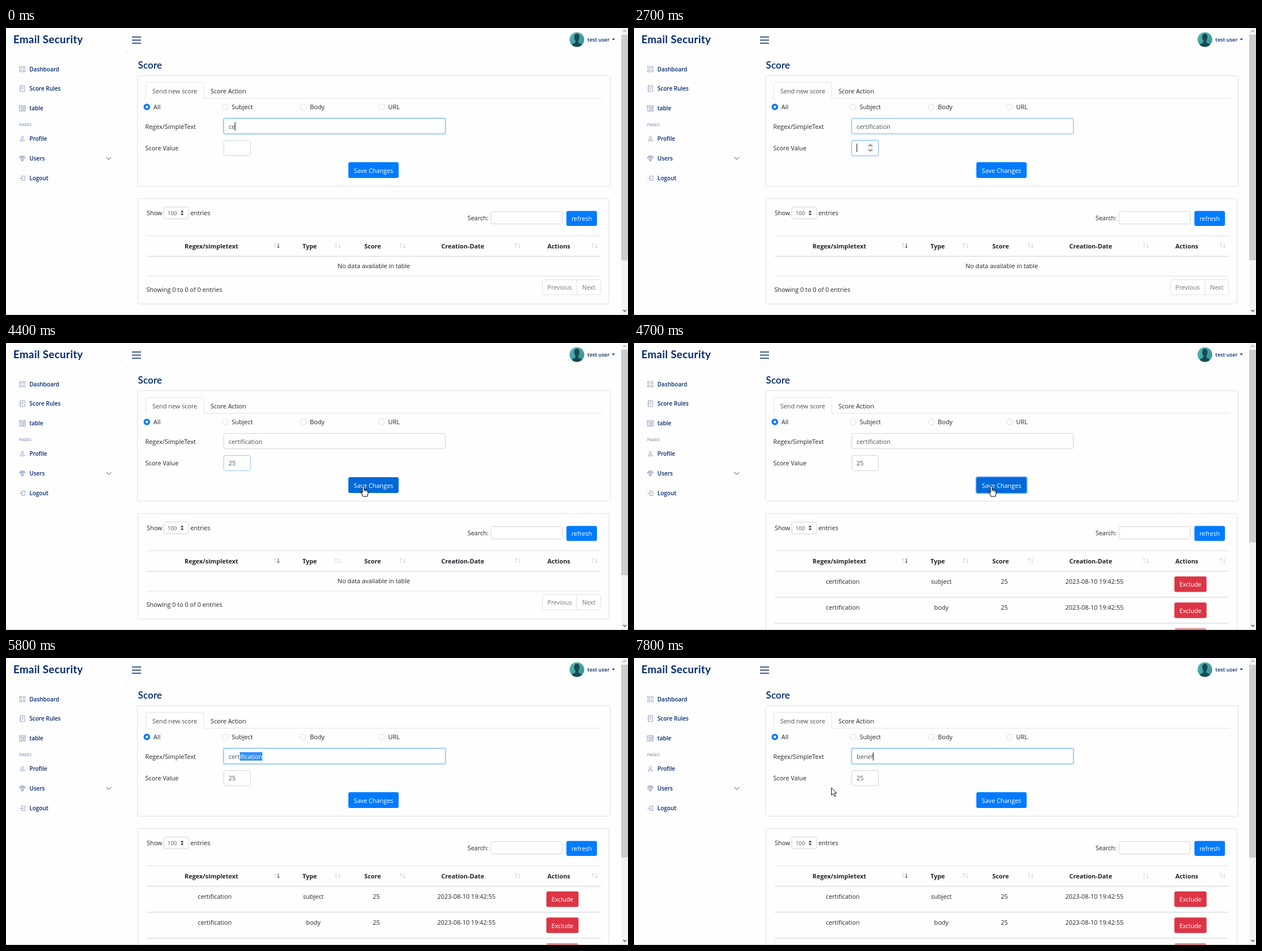
Write an HTML page with a canvas that moves like this. It is 1101 px wide and 509 px high and loops after 8 s.

```html
<!DOCTYPE html>
<html lang="en">
<head>
<meta charset="utf-8">
<title>Email Security</title>
<style>
html, body { margin: 0; width: 100%; height: 100%; overflow: hidden; background: #fefefe; }
canvas { display: block; }
</style>
</head>
<body>
<canvas id="stage" width="1101" height="509"></canvas>
<script>
const ctx = document.getElementById('stage').getContext('2d');
const LOOP = 8000;
const SANS = '"Open Sans", "Noto Sans", sans-serif';
const ROUND = 'Lato, "Open Sans", sans-serif';
const INK = '#212529', NAVY = '#012970', BLUE = '#007bff', RULE = '#dee2e6';
const FIELD_TEXT = '#495057', MUTED = '#899bbd', PAPER = '#fefefe';

// Stepped keyframes: [time, value]
const fill = [
  [0, 'ce'], [100, 'cer'], [300, 'cert'], [600, 'certi'], [800, 'certif'],
  [900, 'certific'], [1000, 'certifica'], [1200, 'certificat'],
  [1300, 'certificatio'], [1400, 'certification'],
  [7300, 'b'], [7400, 'be'], [7500, 'ben'], [7600, 'bene'], [7800, 'benef']
];
const score = [[0, ''], [3400, '2'], [3600, '25']];
const fillCaret = [[0, 1], [1800, 0], [2300, 1], [2700, 0], [5600, 1], [5700, 0], [7300, 1]];
const scoreCaret = [[0, 0], [2700, 1], [3200, 0], [3400, 1], [4100, 0]];
const fillFocus = [[0, 1], [2700, .5], [2800, 0], [5700, .6], [5800, 1]];
const scoreFocus = [[0, 0], [2700, .5], [2800, 1], [4400, .35], [4600, 0]];
const saveFocus = [[0, 0], [4600, .6], [4700, 1], [5600, .8], [5700, .3], [5800, 0]];
const saveDark = [[0, 0], [4000, .6], [4100, 1], [5700, .4], [5800, 0]];
const spinner = [[0, 0], [2400, 1], [3700, 0], [6100, 1], [6300, 0]];
const selectFrom = [[0, -1], [5700, 9], [5800, 4], [5900, 0], [7300, -1]];
const loaded = [[0, 0], [4600, 1]];
const mouse = [
  [0, null],
  [3700, ['arrow', 441, 222]], [3800, ['arrow', 508, 234]],
  [3900, ['arrow', 582, 247]], [4000, ['hand', 624, 252]],
  [4100, ['hand', 632, 253]],
  [5000, ['hand', 614, 244]], [5100, ['arrow', 556, 215]],
  [5200, ['arrow', 498, 191]], [5300, null],
  [5900, ['arrow', 366, 176]], [6100, ['arrow', 349, 226]],
  [6300, ['arrow', 349, 230]]
];

function at(keys, t) {
  let value = keys[0][1];
  for (const [time, v] of keys) if (t >= time) value = v;
  return value;
}

function setFont(size, weight, family) {
  ctx.font = `${weight} ${size}px ${family}`;
}

// y is the middle of the capitals
function text(str, x, y, opt = {}) {
  const { size = 10.9, weight = 400, color = INK, align = 'left', family = SANS, gap = 0 } = opt;
  setFont(size, weight, family);
  ctx.letterSpacing = gap + 'px';
  ctx.textAlign = align;
  ctx.fillStyle = color;
  ctx.fillText(str, x, y + size * .357);
  ctx.letterSpacing = '0px';
}

function widthOf(str) {
  setFont(10.9, 400, SANS);
  return ctx.measureText(str).width;
}

function rect(x, y, w, h, color) {
  ctx.fillStyle = color;
  ctx.fillRect(x, y, w, h);
}

function box(x, y, w, h, r, back, border) {
  ctx.beginPath();
  ctx.roundRect(x, y, w, h, r);
  if (back) { ctx.fillStyle = back; ctx.fill(); }
  if (border) { ctx.strokeStyle = border; ctx.lineWidth = 1; ctx.stroke(); }
}

function path(d, color, width = 1, back) {
  const p = new Path2D(d);
  if (back) { ctx.fillStyle = back; ctx.fill(p); }
  if (color) { ctx.strokeStyle = color; ctx.lineWidth = width; ctx.stroke(p); }
}

function disc(x, y, r, color, border) {
  ctx.beginPath();
  ctx.arc(x, y, r, 0, Math.PI * 2);
  if (color) { ctx.fillStyle = color; ctx.fill(); }
  if (border) { ctx.strokeStyle = border; ctx.lineWidth = 1; ctx.stroke(); }
}

function blend(a, b, k) {
  const c = a.map((v, i) => Math.round(v + (b[i] - v) * k));
  return `rgb(${c})`;
}

function glow(x, y, w, h, color, level) {
  if (!level) return;
  ctx.globalAlpha = level;
  box(x - 1.7, y - 1.7, w + 3.4, h + 3.4, 4, color);
  ctx.globalAlpha = 1;
}

function input(x, y, w, h, focus = 0) {
  glow(x, y, w, h, '#bfdeff', focus > .4 ? focus : 0);
  box(x, y, w, h, 3, '#fff', blend([206, 212, 218], [128, 189, 255], Math.min(1, focus * 2)));
}

function button(label, x, y, w, h, color) {
  box(x, y, w, h, 3, color);
  text(label, x + w / 2, y + h / 2 + .8, { color: '#fff', align: 'center' });
}

function caret(x, y) {
  rect(Math.round(x), y, 1, 15, '#111');
}

const menu = [
  ['Dashboard', 73, 'M1 1h5v5H1zM10 1h5v5h-5zM1 10h5v5H1zM10 10h5v5h-5z'],
  ['Score Rules', 107.5, 'M3 .5h11v15H3zM1 4h3M1 8h3M1 12h3M6 4.5h5M6 7.5h5M6 10.5h3'],
  ['table', 142.5, 'M.5 1h15v14H.5zM.5 4.5h15M5 4.5v10M7.5 7h6M7.5 9.5h6M7.5 12h6'],
  ['Profile', 196, 'M11 5a3 3 0 1 1-6 0a3 3 0 1 1 6 0M2.5 14c0-3 2-4 5.5-4s5.5 1 5.5 4z'],
  ['Users', 231.5, 'M3.5 1.5h9l3 4L8 15 .5 5.5zM.5 5.5h15M5.5 5.5L8 15l2.5-9.5M3.5 1.5l2 4L8 1.5l2.5 4 2-4'],
  ['Logout', 266.5, 'M6 5V2.5h8.5v11H6V11M.5 8h9M7 5.5L9.5 8 7 10.5']
];

function drawSidebar() {
  text('Email Security', 13, 20.5, { size: 18.8, weight: 700, color: NAVY, family: ROUND, gap: .35 });
  for (const [label, y, icon] of menu) {
    ctx.save();
    ctx.translate(23.3, y - 5.6);
    ctx.scale(.7, .7);
    path(icon, MUTED, 1.3);
    ctx.restore();
    text(label, 41.5, y, { size: 10, weight: 600, color: NAVY });
  }
  text('PAGES', 23, 171, { size: 7.3, weight: 600, color: MUTED });
  path('M177.5 229l4.3 4.3 4.3-4.3', '#6f80a6', 1.1);
  path('M212.5 47v-4.5h5', '#eceff3', 1);
}

function drawHeader() {
  path('M223 16h16M223 21.5h16M223 27h16', NAVY, 1.3);
  ctx.save();
  const shade = ctx.createLinearGradient(998, 8, 1022, 33);
  shade.addColorStop(0, '#5cb8b6');
  shade.addColorStop(1, '#2f8f93');
  disc(1010.5, 20.5, 13, shade);
  ctx.clip();
  path('M1001 34c0-6 4-7 7-8v-3c-5-8-1-13 2.5-13s7.5 5 2.5 13v3c3 1 7 2 7 8z', null, 0, '#174a52');
  ctx.restore();
  text('test user', 1029, 20.5, { size: 9.3, weight: 600, color: NAVY });
  path('M1072.5 18.7h5.4l-2.7 3z', null, 0, NAVY);
  text('Score', 233.5, 66, { size: 17.1, weight: 600, color: NAVY, family: ROUND, gap: .1 });
}

function drawSpinner() {
  rect(413, 204, 11, 17, '#efefef');
  rect(413, 212, 11, 1, '#fff');
  path('M415.5 209.8l3-3 3 3M415.5 215.2l3 3 3-3', '#555', 1.2);
}

function drawForm(t) {
  box(232.5, 84.5, 837, 196, 3, null, '#dfdfdf');
  rect(247, 124, 808, 1, RULE);
  path('M247.5 125V99.5q0-3 3-3h96.500q3 0 3 3V125', RULE, 1, PAPER);
  text('Send new score', 259, 112, { color: FIELD_TEXT });
  text('Score Action', 362, 112);

  ['All', 'Subject', 'Body', 'URL'].forEach((label, i) => {
    const x = 249.3 + i * 138.5;
    if (i) disc(x, 140, 5.2, '#fff', '#d6dade');
    else { disc(x, 140, 5.8, BLUE); disc(x, 140, 2.2, '#fff'); }
    text(label, x + 11.7, 140.5);
  });

  text('Regex/SimpleText', 246.5, 175);
  text('Score Value', 246.5, 213.5);
  input(385.5, 160.5, 392, 27, at(fillFocus, t));
  input(385.5, 199.500, 47, 27, at(scoreFocus, t));

  const word = at(fill, t), from = at(selectFrom, t);
  const opt = { color: FIELD_TEXT };
  text(word, 394, 175, opt);
  if (from >= 0) {
    const x = 394 + widthOf(word.slice(0, from));
    const w = 394 + widthOf(word) - x;
    ctx.save();
    ctx.beginPath();
    ctx.rect(x, 167, w, 15);
    ctx.clip();
    rect(x, 167, w, 15, '#3390ff');
    text(word, 394, 175, { color: '#fff' });
    ctx.restore();
  }
  if (at(fillCaret, t)) caret(393.5 + widthOf(word), 167);

  const num = at(score, t);
  text(num, 394, 213.5, opt);
  if (at(spinner, t)) drawSpinner();
  if (at(scoreCaret, t)) caret(394 + widthOf(num), 205);

  glow(606, 238, 89, 28, '#8fc4ff', at(saveFocus, t));
  button('Save Changes', 606, 238, 89, 28, blend([0, 123, 255], [0, 105, 217], at(saveDark, t)));
}

function sortMark(x, active) {
  path(`M${x - 3} 390v-8m-1.700 2l1.700-2 1.700 2`, '#cfd1d3', 1);
  path(`M${x + 3} 382v8m-1.700-2l1.700 2 1.700-2`, active ? '#3a3d40' : '#cfd1d3', 1);
}

const columns = [
  ['Regex/simpletext', 363.5, 479], ['Type', 537.5, 587], ['Score', 649, 702],
  ['Creation-Date', 808.5, 906], ['Actions', 978.5, 1042]
];

function drawRow(kind, top) {
  const y = top + 18.5;
  const cells = [['certification', 369.5], [kind, 544], ['25', 655.5], ['2023-08-10 19:42:55', 815]];
  for (const [label, x] of cells) text(label, x, y, { align: 'center' });
  button('Exclude', 956.5, top + 9.5, 57, 27.5, '#dc3545');
  rect(249, top + 45.5, 804, 1.6, RULE);
}

function drawTable(t) {
  const full = at(loaded, t);
  box(233.5, 302.5, 834, full ? 260 : 187, 3, null, '#dfdfdf');
  text('Show', 249, 328);
  box(279.5, 317.5, 43.5, 21, 3, '#fff', '#ced4da');
  text('100', 286, 328.5, { size: 9.6, color: FIELD_TEXT });
  path('M309 327h5.400l-2.700-3.400zM309 329h5.400l-2.700 3.400z', null, 0, '#343a40');
  text('entries', 326.500, 328);
  text('Search:', 817, 337.5);
  input(858.5, 325.5, 126, 22);
  button('refresh', 992, 324.5, 54, 26.5, BLUE);

  rect(249, 368, 804, 1, RULE);
  columns.forEach(([label, x, sortX], i) => {
    text(label, x, 387, { weight: 700, align: 'center' });
    sortMark(sortX, i === 0);
  });
  rect(249, 404, 804, 1.6, RULE);

  if (full) {
    ['subject', 'body', 'url'].forEach((kind, i) => drawRow(kind, 404.5 + i * 46.2));
    return;
  }
  text('No data available in table', 651, 422.5, { align: 'center' });
  rect(249, 439.5, 804, 1, RULE);
  text('Showing 0 to 0 of 0 entries', 248.5, 464);
  box(949.5, 446.5, 103, 26.5, 3, '#fff', RULE);
  rect(1010, 446.5, 1, 26.5, RULE);
  text('Previous', 980, 460.5, { color: '#6c757d', align: 'center' });
  text('Next', 1031.5, 460.5, { color: '#6c757d', align: 'center' });
}

function drawFrame(t) {
  rect(1089, 0, 12, 508, '#f3f3f3');
  rect(1089, 12, 12, at(loaded, t) ? 342 : 400, '#cdcdcd');
  path('M1092.500 7l2.700-2.700 2.700 2.700', '#a3a3a3', 1.3);
  path('M1092.500 500l2.700 2.700 2.700-2.700', '#505050', 1.4);
  rect(0, 508, 1101, 1, '#d9d0c6');
}

function drawMouse(t) {
  const m = at(mouse, t);
  if (!m) return;
  ctx.save();
  ctx.translate(m[1], m[2]);
  ctx.lineJoin = 'round';
  if (m[0] === 'arrow') {
    path('M.5 0v13.200l3-2.700 2.200 5 2.200-1-2.200-4.800h4z', '#111', 1, '#fff');
  } else {
    path('M-1 1.500q1.500-2 3 0v6q1.500-1 2.500.500 1.500-.800 2.300.700 2-.500 2 1.500v4l-1.500 5H.500l-4-6.500q-.800-2 1-1.800L-1 12.500z', '#111', 1.1, '#fff');
    path('M2 7.500v3M4.500 8.500v2.500M6.800 9.500v2', '#111', .8);
  }
  ctx.restore();
}

function draw(now) {
  const t = now % LOOP;
  rect(0, 0, 1101, 509, PAPER);
  drawSidebar();
  drawHeader();
  drawForm(t);
  drawTable(t);
  drawFrame(t);
  drawMouse(t);
}

const start = performance.now();
function tick() {
  draw(performance.now() - start);
  requestAnimationFrame(tick);
}
tick();
</script>
</body>
</html>
```
